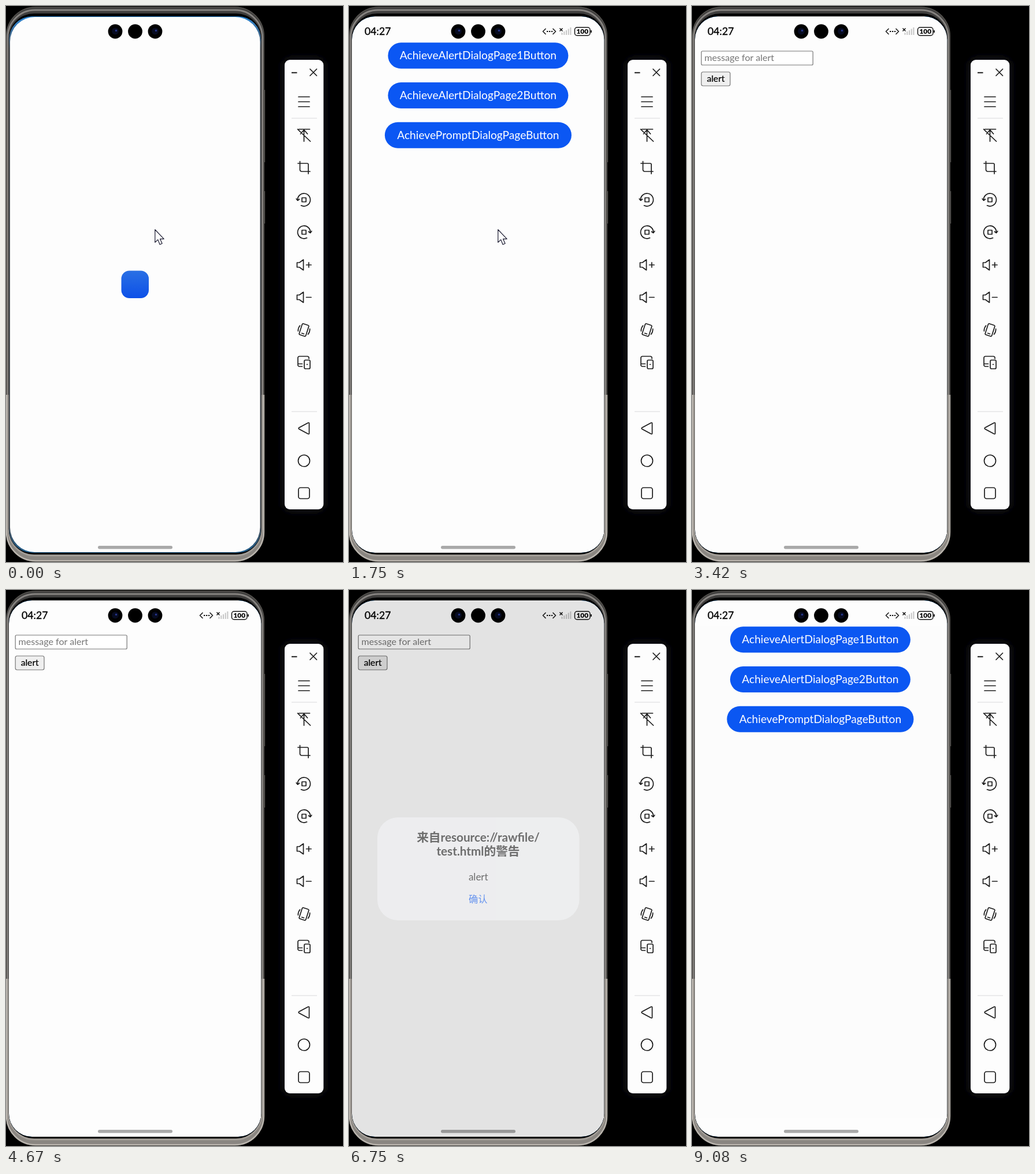
An HTML page for the animation above (9160 ms loop, 583 px wide and 961 px high).

```html
<!DOCTYPE html>
<html lang="en">
<head>
<meta charset="utf-8">
<title>Web dialog demo</title>
<style>
  html, body { margin: 0; width: 100%; height: 100%; overflow: hidden; background: #000; }
  svg { display: block; width: 100vw; height: 100vh; }
  text { font-family: Lato, "Noto Sans CJK SC", "Noto Sans CJK", sans-serif; }
  .mid { text-anchor: middle; }
  .line { fill: none; stroke: #1c1c1c; stroke-width: 1.7; stroke-linecap: round; stroke-linejoin: round; }
</style>
</head>
<body>
<svg viewBox="0 0 583 961" preserveAspectRatio="none">
  <defs>
    <clipPath id="screenClip"><rect x="5" y="18" width="436.500" height="927" rx="40"/></clipPath>
    <clipPath id="pageClip"><rect x="6" y="63" width="435" height="850"/></clipPath>
    <clipPath id="lower"><rect y="672" width="450" height="289"/></clipPath>
    <linearGradient id="wall" x1="0" y1="0" x2="0" y2="1">
      <stop offset="0" stop-color="#2b86d6"/><stop offset=".06" stop-color="#4a4f55"/>
      <stop offset=".95" stop-color="#4a4f55"/><stop offset="1" stop-color="#1d5c8c"/>
    </linearGradient>
    <linearGradient id="icon" x1="0" y1="0" x2="0" y2="1">
      <stop offset="0" stop-color="#2a70e4"/><stop offset="1" stop-color="#0d50e8"/>
    </linearGradient>
    <filter id="glow" x="-60%" y="-10%" width="220%" height="120%"><feGaussianBlur stdDeviation="9"/></filter>
  </defs>
  <rect width="583" height="961"/>

  <!-- phone body -->
  <path d="M447.200 145v125M447.200 320v56" stroke="#4b4a49" stroke-width="2"/>
  <g fill="none">
    <rect x=".8" y="2" width="445.400" height="957.500" rx="50" fill="#3f3e3d" stroke="#55534f" stroke-width="1.600"/>
    <rect x="3" y="7" width="440.500" height="947" rx="47" stroke="#85827f" stroke-width="2.800"/>
    <g clip-path="url(#lower)">
      <rect x="1" y="2" width="445" height="957" rx="50" fill="#8a8681" stroke="#bab5ae" stroke-width="2.400"/>
      <rect x="3.800" y="7" width="439" height="943" rx="46" stroke="#a39e98" stroke-width="2.400"/>
    </g>
    <rect x="4.600" y="13" width="437.400" height="935" rx="44" fill="#000"/>
  </g>

  <g clip-path="url(#screenClip)">
    <rect x="5" y="18" width="437" height="927" fill="url(#wall)"/>
    <rect id="window" fill="#fdfdfd"/>
    <g id="app" clip-path="url(#pageClip)">
      <g id="menu"></g>
      <g id="web">
        <rect x="5" y="63" width="440" height="850" fill="#fdfdfd"/>
        <g id="form">
          <rect x="16.200" y="78" width="193" height="24" rx="2" fill="#fff" stroke="#767676" stroke-width="1.200"/>
          <text x="21.500" y="95.300" font-size="16.100" fill="#757575">message for alert</text>
          <rect id="alertBtn" x="16.200" y="114" width="49.800" height="24" rx="3" stroke="#767676" stroke-width="1.200"/>
          <text class="mid" x="41.200" y="131.300" font-size="15.700" stroke="#000" stroke-width=".2">alert</text>
        </g>
      </g>
    </g>
    <rect id="splash" x="199.500" y="457.500" width="47.500" height="47.500" rx="14" fill="url(#icon)"/>
    <g id="status">
      <text x="27" y="50" font-size="17.700" stroke="#000" stroke-width=".35">04:27</text>
      <path class="line" d="M340 39.500l-4.500 4.500 4.500 4.500M353 39.500l4.500 4.500-4.500 4.500"/>
      <path d="M342 44h2.400m1.600 0h2.400m1.600 0h2.200" stroke="#111" stroke-width="2"/>
      <path d="M364.500 38.500l5 5m0-5l-5 5" stroke="#111" stroke-width="1.500"/>
      <path d="M368.500 50v-4M372.300 50v-6M376 50v-8M379.700 50v-10.500M383.400 50v-13" stroke="#c6c6c6" stroke-width="2"/>
      <rect x="390.500" y="37" width="26.500" height="14" rx="4" fill="#fff" stroke="#111" stroke-width="1.500"/>
      <path d="M419 42v4" stroke="#111" stroke-width="1.800"/>
      <text class="mid" x="403.800" y="48.300" font-size="11.800" font-weight="900">100</text>
    </g>
    <rect x="159" y="933" width="129" height="5.500" rx="2.750" fill="#a9a9a9"/>
    <rect id="mask" x="5" y="18" width="437" height="927"/>
    <g id="dialog">
      <rect x="49" y="393" width="349.500" height="178" rx="36" fill="#f5f6f9"/>
      <g class="mid" fill="#161616" font-size="20.700" font-weight="700">
        <text x="223.500" y="434.500">来自resource://rawfile/</text>
        <text x="223.500" y="458.500">test.html的警告</text>
      </g>
      <text class="mid" x="223.800" y="502.300" font-size="17" fill="#161616">alert</text>
      <text class="mid" x="223.300" y="539.500" font-size="16.200" fill="#0a59f7">确认</text>
    </g>
  </g>
  <g id="cameras"></g>
  <path id="cursor" d="M257.800 386.500v22l5-4.600 3.300 8.300 4-1.700-3.500-7.800h6.600z" fill="#fff" stroke="#1a1a30" stroke-width="1.200" stroke-linejoin="round"/>

  <!-- emulator toolbar -->
  <rect x="482" y="93" width="67" height="777" rx="10" fill="#1c1c28" filter="url(#glow)"/>
  <rect x="482" y="93" width="67.300" height="777" rx="9" fill="#fdfdfd"/>
  <path d="M494 194h44M494 701h44" stroke="#d9d9dc" stroke-width="1.200"/>
  <path d="M494 115.300h9.500" stroke="#1c1c1c" stroke-width="2"/>
  <path class="line" d="M526 109l11.500 11.500m0-11.500L526 120.500"/>
  <g id="tools"></g>
</svg>
<script>
const LOOP = 9160, PUSH = 2500, POP = 8747, WIDTH = 434;
const $ = id => document.getElementById(id);
const clamp = v => Math.min(1, Math.max(0, v));
const ramp = (t, from, to) => clamp((t - from) / (to - from));
const show = (id, on) => $(id).setAttribute('visibility', on ? 'visible' : 'hidden');
const fade = (id, v) => $(id).setAttribute('opacity', v.toFixed(3));
const shift = (id, x) => $(id).setAttribute('transform', `translate(${x.toFixed(2)})`);

// critically damped spring, 0 to 1
function spring(ms) {
  const x = Math.max(0, ms) * 0.018;
  return 1 - (1 + x) * Math.exp(-x);
}

const buttons = [
  ['AchieveAlertDialogPage1Button', 312],
  ['AchieveAlertDialogPage2Button', 312],
  ['AchievePromptDialogPageButton', 323]
];
$('menu').innerHTML = '<rect x="5" y="63" width="530" height="850" fill="#fdfdfd"/>' +
  buttons.map(([label, w], i) => {
    const y = 63.3 + i * 68.7;
    return `<rect x="${223.4 - w / 2}" y="${y}" width="${w}" height="45" rx="22.500" fill="#0b57f3"/>
      <text class="mid" x="223.400" y="${y + 29}" font-size="19.200" fill="#fff">${label}</text>`;
  }).join('') +
  '<rect id="shade" x="-100" y="63" width="640" height="850" fill="#000014"/>';

$('cameras').innerHTML = [189, 223.5, 258].map((x, i) =>
  `<circle cx="${x}" cy="44" r="12.400"/>` + (i === 1 ? '' :
  `<circle cx="${x}" cy="43.500" r="6" fill="#070b20"/><circle cx="${x + 1.5}" cy="42.500" r="1.700" fill="#26368c"/>`)
).join('');

// toolbar icons, each drawn around its own centre
const speaker = 'M-12-4h4l7-5V9l-7-5h-4z';
const turn = 'M-11 1A11 11 0 1 1-5 9.800M-13.200-1.800l2.200 3 3-2.200M-3.500-3.500h7v7h-7z';
const tools = [
  [165.5, 'M-9.500-8.500h19M-9.500 0h19M-9.500 8.500h19'],
  [223, 'M-9-10H10M0-9V11M-6-2l6-7 6 7M-11-10L11 11'],
  [279, 'M-10.500-7H5.500a2 2 0 0 1 2 2V11M-7-10.500V4a3 3 0 0 0 3 3H10.500'],
  [335, turn],
  [391, turn, 'scale(-1 1)'],
  [447.5, speaker + 'M4 0h8.500M8.250-4.200v8.400'],
  [503.5, speaker + 'M4 0h8.500'],
  [560, 'M-4-10H4a2 2 0 0 1 2 2V8a2 2 0 0 1-2 2H-4a2 2 0 0 1-2-2V-8a2 2 0 0 1 2-2zM-2 6.500h4M-9-5q-2 5 0 10M9-5q2 5 0 10', 'rotate(18)'],
  [616, 'M-3 7H-8a2.500 2.500 0 0 1-2.500-2.500V-8A2.500 2.500 0 0 1-8-10.500H6A2.500 2.500 0 0 1 8.500-8V-6.500M-10.500 2.500H-3M2.500-4H8.500a2 2 0 0 1 2 2V9a2 2 0 0 1-2 2H2.500a2 2 0 0 1-2-2V-2a2 2 0 0 1 2-2zM5 3.500h1'],
  [730, 'M-8.500-1.200L7-9.500q2-.8 2 1V8.500q0 1.800-2 1L-8.500 1.200q-1.600-1.200 0-2.400z'],
  [786, 'M-10 0a10 10 0 1 0 20 0a10 10 0 1 0-20 0z'],
  [842, 'M-6-9.500H6A3.500 3.500 0 0 1 9.500-6V6A3.500 3.500 0 0 1 6 9.500H-6A3.500 3.500 0 0 1-9.500 6V-6A3.500 3.500 0 0 1-6-9.500z']
];
$('tools').innerHTML = tools.map(([y, d, extra = '']) =>
  `<path class="line" transform="translate(515.500 ${y}) ${extra}" d="${d}"/>`).join('');

function render(t) {
  // window opens the last few pixels
  const gap = 1 - ramp(t, 0, 160);
  const box = { x: 5 + 2 * gap, y: 18 + gap, width: 436.5 - 4 * gap, height: 927 - 2 * gap, rx: 40 + 3 * gap };
  for (const key in box) $('window').setAttribute(key, box[key]);

  show('status', t >= 330);
  fade('splash', 1 - ramp(t, 830, 1000));
  fade('app', ramp(t, 830, 1000));
  show('cursor', t < 1920);

  const p = spring(t - PUSH) - spring(t - POP);
  shift('menu', -p * WIDTH * 0.2);
  shift('web', (1 - p) * WIDTH);
  fade('shade', 0.1 * p);
  show('web', t >= PUSH);
  show('form', t >= 3170);
  $('alertBtn').setAttribute('fill', t < 5000 ? '#efefef' : '#e5e5e5');

  const open = ramp(t, 5170, 5370) - ramp(t, 6670, 6860);
  fade('dialog', open);
  fade('mask', 0.18 * open);
}

const start = performance.now();
function tick() {
  render((performance.now() - start) % LOOP);
  requestAnimationFrame(tick);
}
render(0);
requestAnimationFrame(tick);
</script>
</body>
</html>
```
